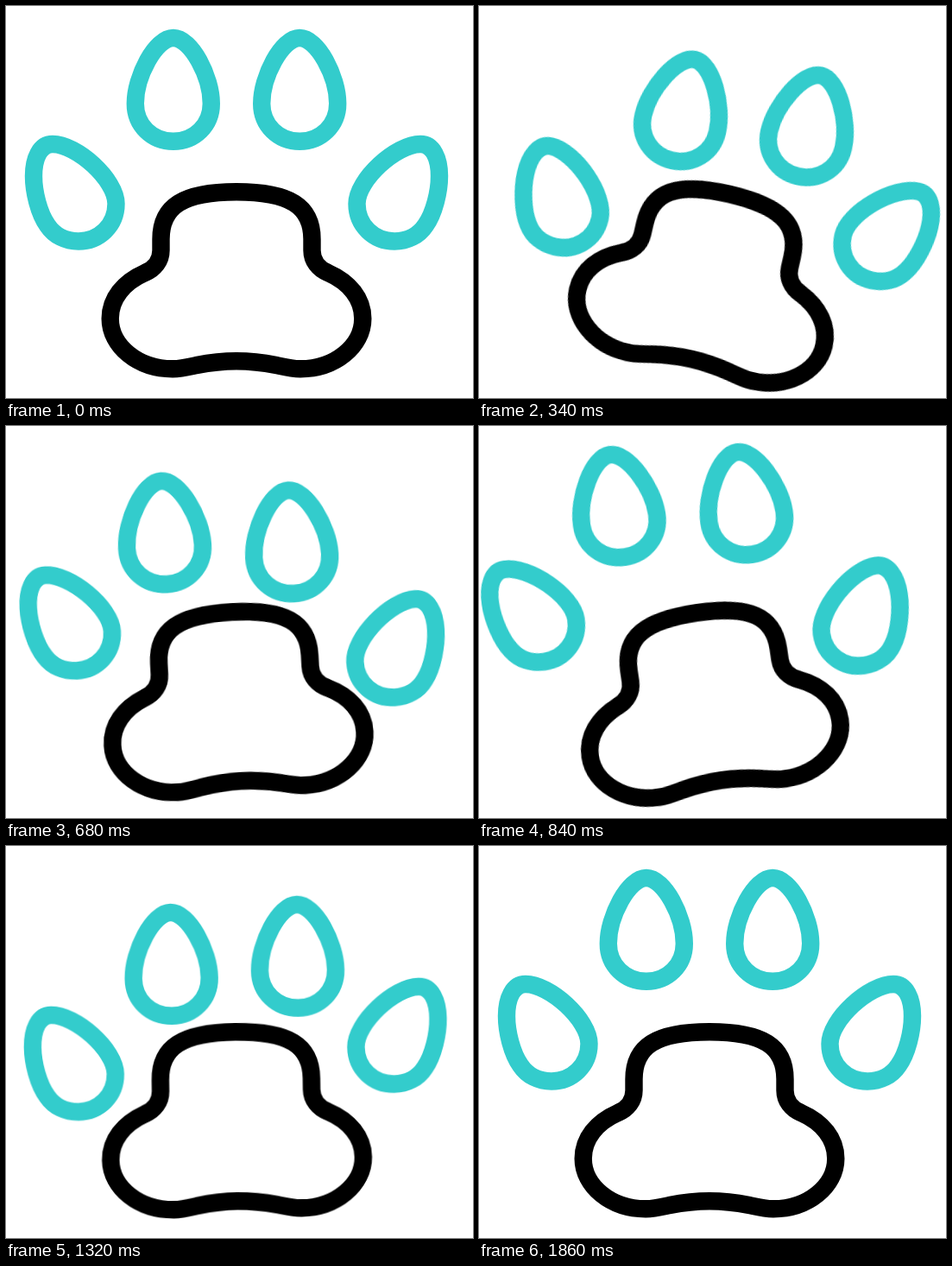
These frames come from a looping animation (541x454 px, 2400 ms). An HTML page:

```html
<!DOCTYPE html>
<html lang="en">
<head>
<meta charset="utf-8">
<title>Waving paw</title>
<style>
  html, body { margin: 0; width: 100%; height: 100%; overflow: hidden; background: #fff; }
  svg { display: block; width: 100%; height: 100%; fill: none; stroke-width: 20.4; }
  .paw {
    stroke: #000;
    transform-origin: 267px 317px;
    animation: swing 2400ms cubic-bezier(.33, 0, .67, 1) infinite;
  }
  .toe {
    stroke: #3cc;
    animation: tap 2400ms cubic-bezier(.33, 0, .67, 1) var(--wait, 0ms) infinite;
  }

  /* damped swing of the whole paw */
  @keyframes swing {
    0% { transform: rotate(0deg); animation-timing-function: cubic-bezier(.33, 0, .6, 1); }
    18.1% { transform: rotate(14.2deg); animation-timing-function: cubic-bezier(.5, 0, .62, 1); }
    33.1% { transform: rotate(-9.1deg); }
    46.25% { transform: rotate(3.9deg); }
    58.333% { transform: rotate(-1.8deg); }
    66.667%, 100% { transform: rotate(0deg); }
  }

  /* each toe presses down twice, one after another */
  @keyframes tap {
    0% { transform: translateY(0); }
    17.5% { transform: translateY(52px); }
    35.625% { transform: translateY(-27px); }
    51.667% { transform: translateY(39px); animation-timing-function: cubic-bezier(.33, 0, .58, 1); }
    66.1%, 100% { transform: translateY(0); }
  }
</style>
</head>
<body>
<svg viewBox="0 0 541 454">
  <defs>
    <path id="outer" d="M54 160C39 160 32 177 32 197C32 215 38 240 48 254C56 266 69 272.5 84 272.5C108 272.5 127.5 254 127.5 229C127.5 201 82 160 54 160Z"/>
    <path id="inner" d="M193.8 37C173 37 149.8 82 149.8 113C149.8 138 169 156.8 193.8 156.8C218.6 156.8 237.8 138 237.8 113C237.8 82 214.6 37 193.8 37Z"/>
  </defs>
  <g class="paw">
    <path d="M267 215.2C205 215.2 179.5 232 179.5 270V283C179.5 295 172 304.5 161 309C136 320 120.7 339 120.7 362C120.7 394 153 420.3 193 420.3C204 420.3 212 418 221 416C236 413 251 411.2 267 411.2C283 411.2 298 413 313 416C322 418 330 420.3 341 420.3C381 420.3 413.3 394 413.3 362C413.3 339 398 320 373 309C362 304.5 354.5 295 354.5 283V270C354.5 232 329 215.2 267 215.2Z"/>
    <g class="toe"><use href="#outer"/></g>
    <g class="toe" style="--wait: 80ms"><use href="#inner"/></g>
    <g class="toe" style="--wait: 160ms"><use href="#inner" transform="matrix(-1 0 0 1 534 0)"/></g>
    <g class="toe" style="--wait: 275ms"><use href="#outer" transform="matrix(-1 0 0 1 534 0)"/></g>
  </g>
</svg>
</body>
</html>
```
